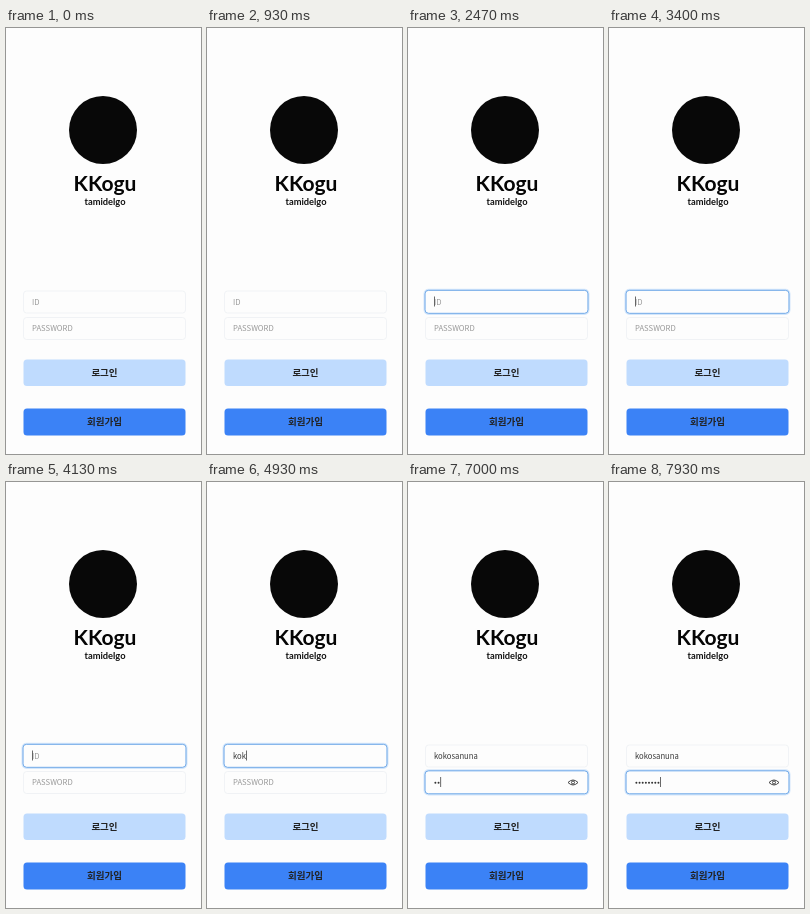
These frames come from a looping animation (195 px wide and 426 px high, 8000 ms). An HTML page:

```html
<!DOCTYPE html>
<html lang="ko">
<head>
<meta charset="utf-8">
<title>로그인</title>
<style>
  html, body { margin: 0; width: 100%; height: 100%; overflow: hidden; background: #fdfdfd; }
  svg { display: block; width: 100%; height: 100%; }
  text { font-family: "Noto Sans CJK KR", "Noto Sans CJK", "Noto Sans", sans-serif; fill: #222; }
  .brand { font: 700 21px Lato, sans-serif; fill: #050505; }
  .tagline { font: 700 9.3px Lato, sans-serif; fill: #111; }
  .button { font-size: 9.5px; font-weight: 700; }
  .value { font-size: 7.7px; }
  .box { fill: #fdfdfd; stroke-width: .7; }
  .halo { fill: none; stroke: #d3e6fb; stroke-width: 2; }
  .edge { fill: none; stroke: #74abe8; stroke-width: 1; }
  .middle { text-anchor: middle; }
</style>
</head>
<body>
<svg viewBox="0 0 195 426">
  <rect width="195" height="426" fill="#fdfdfd"/>
  <circle cx="97" cy="102" r="34" fill="#080808"/>
  <text class="brand middle" x="99" y="163">KKogu</text>
  <text class="tagline middle" x="99" y="177">tamidelgo</text>
  <g id="fields"></g>
  <g id="eye" fill="none" stroke="#333" stroke-width=".9">
    <path d="M160 300.5Q165 295.5 170 300.5Q165 305.5 160 300.5Z"/>
    <circle cx="165" cy="300.5" r="1.5"/>
  </g>
  <rect x="17.5" y="331.5" width="162" height="26.5" rx="3.5" fill="#bfdbfe"/>
  <text class="button middle" x="98.5" y="348">로그인</text>
  <rect x="17.5" y="380.5" width="162" height="27" rx="3.5" fill="#3b82f6"/>
  <text class="button middle" x="98.5" y="397">회원가입</text>
</svg>
<script>
const LOOP = 8000, BLINK = 530, FADE = 150, LEFT = 26, DOT_PITCH = 3.15;
const USER = "kokosanuna", SECRET_LENGTH = 8;
const idTiming = { focus: 2000, blur: 6450, type: 4600, step: 155, count: USER.length };
const secretTiming = { focus: 6450, blur: LOOP, type: 6700, step: 160, count: SECRET_LENGTH };

const clamp = (v, lo, hi) => Math.min(hi, Math.max(lo, v));

function add(parent, tag, attributes) {
  const node = document.createElementNS("http://www.w3.org/2000/svg", tag);
  for (const key in attributes) node.setAttribute(key, attributes[key]);
  return parent.appendChild(node);
}

function makeField(y, hint) {
  const group = document.getElementById("fields");
  const box = add(group, "rect", { class: "box", x: 17.5, y, width: 162, height: 22, rx: 3 });
  const ring = add(group, "g", {});
  add(ring, "rect", { class: "halo", x: 16.5, y: y - 1.3, width: 164, height: 24.3, rx: 4 });
  add(ring, "rect", { class: "edge", x: 17, y: y - .7, width: 163, height: 23, rx: 3.5 });
  const text = add(group, "text", { class: "value", x: LEFT, y: y + 13.7 });
  const dots = Array.from({ length: SECRET_LENGTH }, (_, i) =>
    add(group, "circle", { cx: LEFT + 1.4 + i * DOT_PITCH, cy: y + 11.3, r: 1, fill: "#333" }));
  const caret = add(group, "rect", { y: y + 5.5, width: .8, height: 10, fill: "#444" });
  return { box, ring, text, dots, caret, hint };
}

const idField = makeField(263, "ID");
const secretField = makeField(289.5, "PASSWORD");
const eye = document.getElementById("eye");

function drawField(field, timing, t, masked) {
  const { focus, blur, type, step, count } = timing;
  const typed = clamp(Math.floor((t - type) / step) + 1, 0, count);
  const focused = t >= focus && t < blur;
  const glow = clamp((t - focus) / FADE, 0, 1) * (1 - clamp((t - blur) / FADE, 0, 1));
  field.ring.setAttribute("opacity", glow);
  field.box.setAttribute("stroke", focused ? "none" : "#ebeef2");

  field.text.textContent = !typed ? field.hint : masked ? "" : USER.slice(0, typed);
  field.text.style.fill = typed ? "#383838" : "#999";
  field.dots.forEach((dot, i) => dot.setAttribute("opacity", masked && i < typed ? 1 : 0));

  const width = !typed ? 0 : masked ? typed * DOT_PITCH : field.text.getComputedTextLength();
  const lastInput = typed ? type + (typed - 1) * step : focus;
  const blinkOn = (t - lastInput) % (2 * BLINK) < BLINK;
  field.caret.setAttribute("x", LEFT + width);
  field.caret.setAttribute("opacity", focused && blinkOn ? 1 : 0);
  return typed;
}

function render(t) {
  drawField(idField, idTiming, t, false);
  const typed = drawField(secretField, secretTiming, t, true);
  eye.setAttribute("opacity", typed ? 1 : 0);
}

let start;
function tick(now) {
  start ??= now;
  render((now - start) % LOOP);
  requestAnimationFrame(tick);
}
requestAnimationFrame(tick);
</script>
</body>
</html>
```
